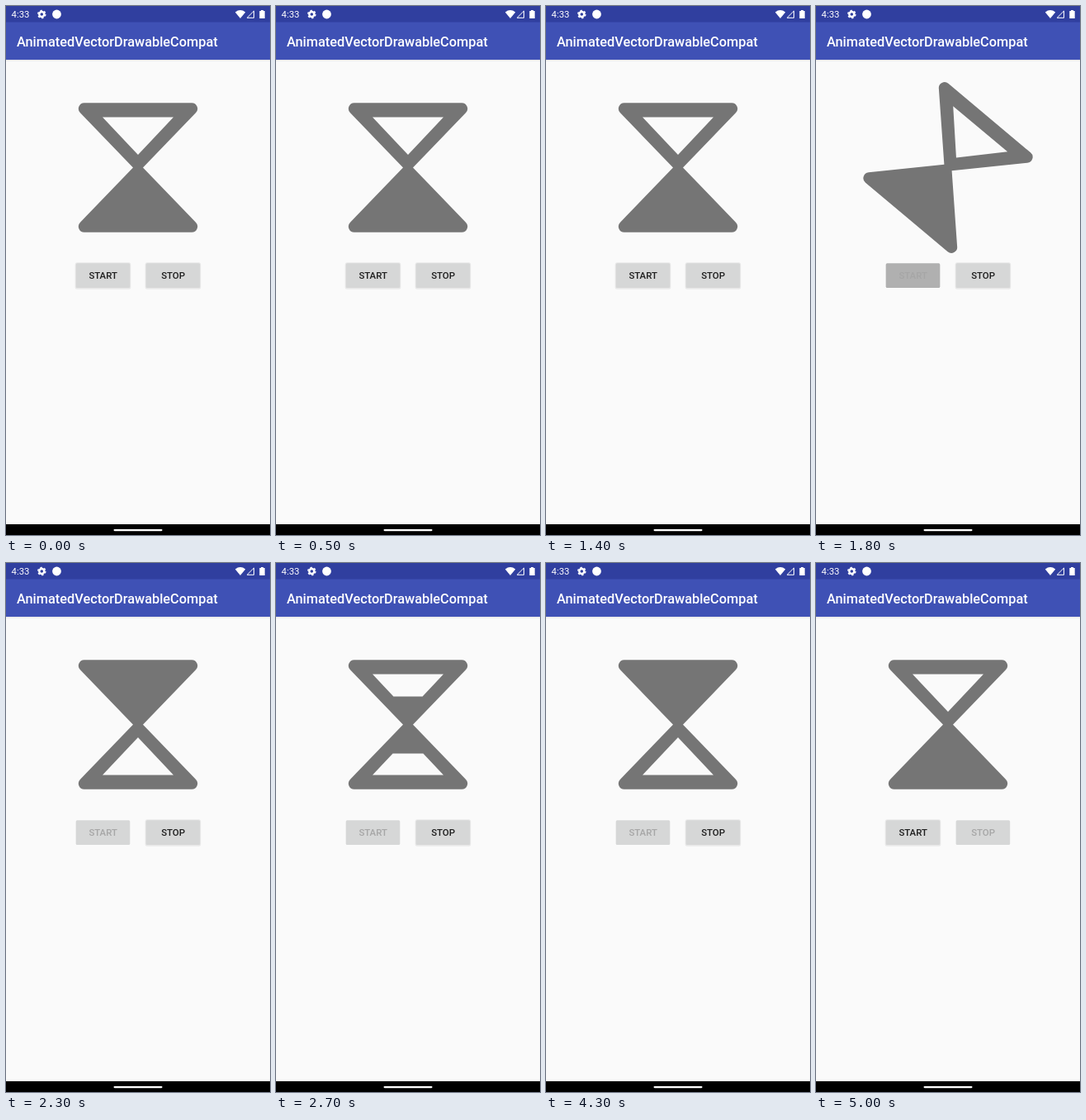
An HTML page for the animation above (5.1 s loop, 320x640 px).

```html
<!DOCTYPE html>
<html lang="en">
<head>
<meta charset="utf-8">
<title>Hourglass</title>
<style>
  html, body { margin: 0; width: 100%; height: 100%; overflow: hidden; background: #fafafa; }
  svg { display: block; width: 100vw; height: 100vh; }
  text { font-family: Roboto, sans-serif; }
  .button text { font-size: 11.43px; font-weight: 500; text-anchor: middle; fill: #1e1e1e; }
  .button .face { fill: #d6d7d7; }
  .button .shadow { fill: #e9e9e9; }
  .disabled text { fill: #a6a6a6; }
  .disabled .shadow { display: none; }
</style>
</head>
<body>
<svg viewBox="0 0 320 640">
  <rect width="320" height="640" fill="#fafafa"/>
  <rect y="65" width="320" height="1.5" fill="#e8e8ea"/>
  <rect y="19" width="320" height="46" fill="#3f51b5"/>
  <rect width="320" height="19.5" fill="#303f9f"/>
  <text x="13" y="49" font-size="16.33" font-weight="500" fill="#fff">AnimatedVectorDrawableCompat</text>

  <g fill="#fff">
    <text x="6.5" y="14" font-size="11.4">4:33</text>
    <circle cx="43.3" cy="10" r="3" fill="none" stroke="#fff" stroke-width="2.4"/>
    <circle cx="43.3" cy="10" r="4.6" fill="none" stroke="#fff" stroke-width="1.4" stroke-dasharray="2.4 2.417"/>
    <circle cx="61.5" cy="10" r="5.4"/>
    <path d="M277.8 7.4Q284 2.8 290.2 7.4L284 15Z"/>
    <path d="M300.5 6V14.3H292.2Z" fill="none" stroke="#fff"/>
    <path d="M307.3 6H309V5H312V6H313.7V15H307.3Z"/>
  </g>

  <g id="hourglass">
    <path fill="#757575" d="M95 117.3H225A7 7 0 0 1 230 129.3L166 195.5L230 261.7A7 7 0 0 1 225 273.7H95A7 7 0 0 1 90 261.7L154 195.5L90 129.3A7 7 0 0 1 95 117.3Z"/>
    <path id="empty" fill="#fafafa"/>
  </g>

  <g id="start" class="button" transform="translate(84.7 311.3)"></g>
  <g id="stop" class="button" transform="translate(169.6 311.3)"></g>

  <rect y="627" width="320" height="13"/>
  <rect x="130.5" y="633" width="59" height="2.2" rx="1.1" fill="#fff"/>
</svg>
<script>
const LOOP = 5100, STEP = 100;
const TURN = 333, FLOW = 1333;
const RUNS = [1696, 3720];
const START_AT = RUNS[0], TAP_AT = 4600, STOP_AT = 4800;
const CENTER = { x: 160, y: 195.5 };

const byId = id => document.getElementById(id);
const clamp = (v, lo = 0, hi = 1) => Math.min(hi, Math.max(lo, v));
const ease = p => (1 - Math.cos(Math.PI * clamp(p))) / 2;

function makeButton(id, label) {
  const group = byId(id);
  group.innerHTML = `
    <rect class="shadow" x="-1" y="-1" width="67.6" height="32.4" rx="2.5"/>
    <rect class="face" width="65.6" height="29.8" rx="1.6"/>
    <rect class="ripple" width="65.6" height="29.8" rx="1.6"/>
    <text x="33" y="19.2">${label}</text>`;
  const ripple = group.querySelector('.ripple');
  return (enabled, strength) => {
    group.classList.toggle('disabled', !enabled);
    ripple.setAttribute('opacity', strength);
  };
}

const setStart = makeButton('start', 'START');
const setStop = makeButton('stop', 'STOP');

// The sand is a band sliding down through both chambers; what it leaves free is empty.
function emptySpace(flow) {
  const rim = 134.5, tip = 180, half = 43;
  const { x, y } = CENTER;
  const mirror = v => 2 * y - v;
  const width = v => half * (tip - v) / (tip - rim);
  const bandTop = 117.3 + 87.3 * flow, bandBottom = bandTop + 69.1;
  const upper = clamp(bandTop, rim, tip);
  const lower = clamp(bandBottom, mirror(tip), mirror(rim));
  const w1 = width(upper), w2 = width(mirror(lower));
  return `M${x - half} ${rim}H${x + half}L${x + w1} ${upper}H${x - w1}Z` +
         `M${x - w2} ${lower}H${x + w2}L${x + half} ${mirror(rim)}H${x - half}Z`;
}

function pose(t) {
  const begin = RUNS.filter(run => t >= run).pop();
  if (begin === undefined || t >= STOP_AT) return { angle: 0, flow: 1 };
  const elapsed = Math.min(t, TAP_AT) - begin;
  return elapsed < TURN
    ? { angle: 180 * ease(elapsed / TURN), flow: 1 }
    : { angle: 0, flow: ease((elapsed - TURN) / FLOW) };
}

const ripple = (t, from, hold, fade) =>
  t < from ? 0 : 0.18 * clamp(1 - (t - from - hold) / fade);

function draw(now) {
  const t = Math.floor(now % LOOP / STEP) * STEP;
  const { angle, flow } = pose(t);
  byId('hourglass').setAttribute('transform', `rotate(${angle} ${CENTER.x} ${CENTER.y})`);
  byId('empty').setAttribute('d', emptySpace(flow));
  setStart(t < START_AT || t >= STOP_AT, ripple(t, 1600, 200, 300));
  setStop(t < STOP_AT, ripple(t, STOP_AT, 0, 200));
}

const origin = performance.now();
function tick() {
  draw(performance.now() - origin);
  requestAnimationFrame(tick);
}
tick();
</script>
</body>
</html>
```
